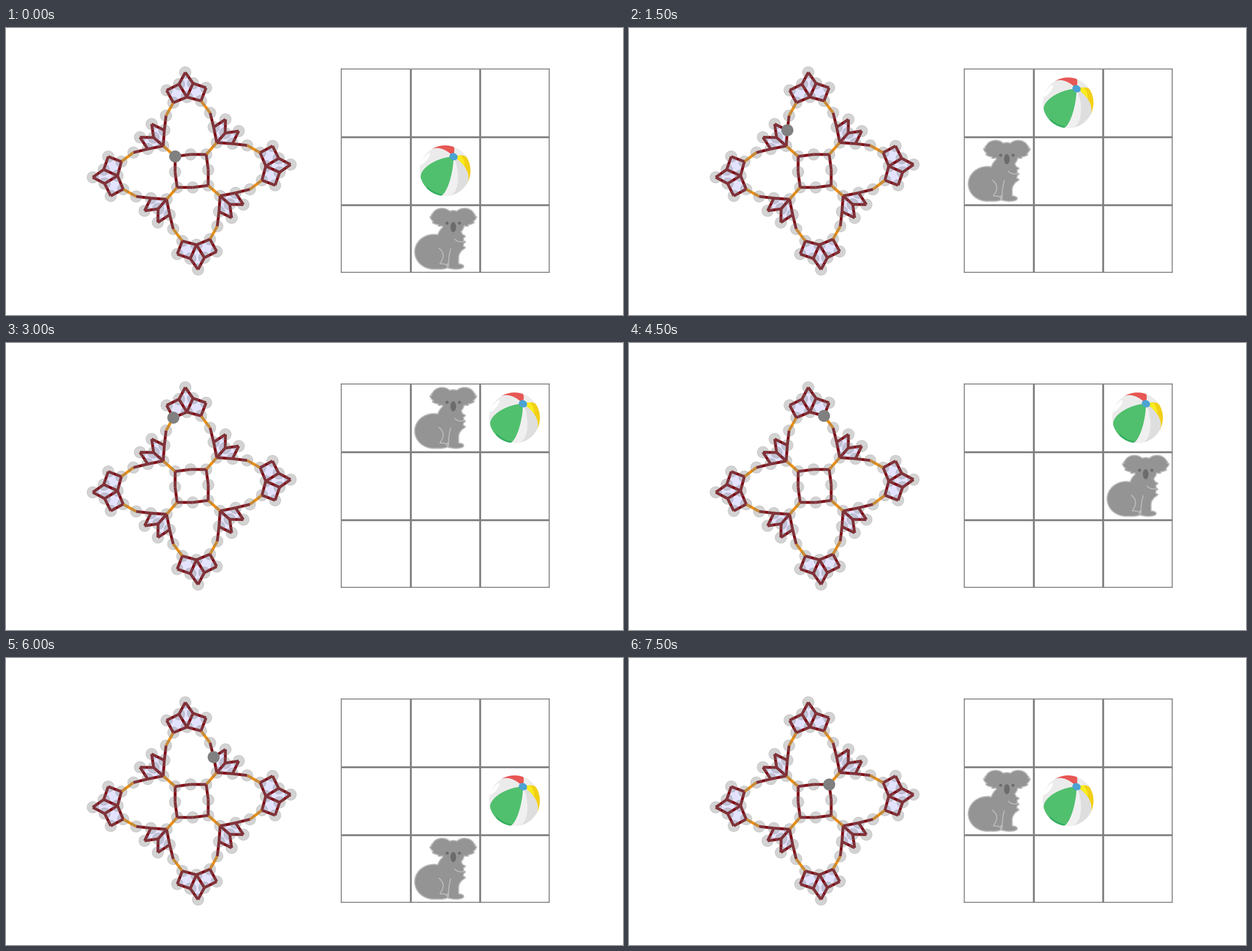
These frames come from a looping animation (1095x511 px, 8000 ms). A matplotlib script:

```python
import numpy as np
import matplotlib.pyplot as plt
from matplotlib.animation import FuncAnimation
from matplotlib.collections import LineCollection
from matplotlib.patches import Circle, Ellipse, PathPatch, Polygon
from matplotlib.path import Path
from matplotlib.transforms import Affine2D

W, H, DPI = 1095, 511, 64
PX = 72 / DPI  # one pixel in points

fig = plt.figure(figsize=(W / DPI, H / DPI), dpi=DPI, facecolor="white")
ax = fig.add_axes([0, 0, 1, 1])
ax.set_xlim(0, W)
ax.set_ylim(H, 0)
ax.axis("off")


# ---- state graph: one arm, repeated by quarter turns ----
HUB = np.array([329.5, 254.5])
DIAGONAL, UPRIGHT = np.radians(-138.6), np.radians(-93.7)


def polar(angle, along, across=0):
    u = np.array([np.cos(angle), np.sin(angle)])
    return HUB + along * u + across * np.array([-u[1], u[0]])


def fan(angle, half, mirror):
    """Node positions by koala cell, mirrored about the fan's axis."""
    nodes = {}
    for cell, (along, across) in half.items():
        nodes[cell] = polar(angle, along, across)
        nodes[mirror(*cell)] = polar(angle, along, -across)
    return nodes


# Each group holds all states with the ball on one kind of cell.
EDGE_BALL = fan(DIAGONAL,
                {(1, 1): (67.3, 0), (1, 2): (90, 0), (0, 1): (84.3, 22.3),
                 (0, 0): (99.2, 43.8), (0, 2): (108.5, 15.7)},
                lambda c, r: (2 - c, r))
CORNER_BALL = fan(UPRIGHT,
                  {(1, 1): (131.8, 0), (0, 2): (175.9, 0),
                   (1, 0): (123.4, -24.6), (0, 0): (146.1, -35.1),
                   (0, 1): (155.6, -12.5)},
                  lambda c, r: (2 - r, 2 - c))
CENTRE_BALL = {(1, 2): polar(DIAGONAL, 39), (0, 2): polar(UPRIGHT, 29.5)}


def turn(p, quarters):
    x, y = np.subtract(p, HUB)
    for _ in range(quarters):
        x, y = -y, x
    return HUB + (x, y)


def cell_edges(nodes):
    """Pairs of positions whose cells are side by side."""
    return [(nodes[c], nodes[d]) for c in nodes
            for d in ((c[0] + 1, c[1]), (c[0], c[1] + 1)) if d in nodes]


def cell_faces(nodes):
    """Squares of four neighbouring cells."""
    squares = [[(c, r), (c + 1, r), (c + 1, r + 1), (c, r + 1)]
               for c in range(2) for r in range(2)]
    return [[nodes[k] for k in s] for s in squares
            if all(k in nodes for k in s)]


corner, side = CENTRE_BALL.values()
walks = cell_edges(EDGE_BALL) + cell_edges(CORNER_BALL)
walks += [(corner, side), (side, turn(corner, 1))]
pushes = [(corner, EDGE_BALL[1, 1]),
          (EDGE_BALL[0, 0], CORNER_BALL[1, 0]),
          (CORNER_BALL[2, 1], turn(EDGE_BALL[2, 0], 1))]
faces = cell_faces(EDGE_BALL) + cell_faces(CORNER_BALL)


def all_turns(shapes):
    return [[turn(p, q) for p in s] for q in range(4) for s in shapes]


for f in all_turns(faces):
    ax.add_patch(Polygon(f, fc="#e3e3ff", ec="none", zorder=1))
for lines, colour in ((pushes, "#ee9012"), (walks, "#800a14")):
    ax.add_collection(LineCollection(all_turns(lines), colors=colour,
                                     linewidths=5 * PX, capstyle="butt",
                                     zorder=2))
for group in (EDGE_BALL, CORNER_BALL, CENTRE_BALL):
    for (p,) in all_turns([[p] for p in group.values()]):
        ax.add_patch(Circle(p, 10.2, fc=(0.5, 0.5, 0.5, 0.34),
                            ec=(0.5, 0.5, 0.5, 0.3), lw=PX, zorder=3))

marker = ax.add_patch(Circle((0, 0), 10.6, fc="#808080", ec="none", zorder=4))


# ---- board ----
ORIGIN, CELL = np.array([594.5, 72.7]), np.array([123.2, 120.9])
END = ORIGIN + 3 * CELL

for i in range(4):
    x, y = ORIGIN + i * CELL
    outer = i in (0, 3)
    style = dict(color="#808080", lw=(1.7 if outer else 3.4) * PX, zorder=5,
                 solid_capstyle="projecting" if outer else "butt")
    ax.plot([x, x], [ORIGIN[1], END[1]], **style)
    ax.plot([ORIGIN[0], END[0]], [y, y], **style)


def cell_centre(cell):
    return ORIGIN + CELL * (np.array(cell) + 0.5)


# ---- sprites ----
class Sprite:
    def __init__(self, z):
        self.shift = Affine2D()
        self.trans = self.shift + ax.transData
        self.z = z

    def add(self, path, **style):
        self.z += 0.01
        ax.add_patch(PathPatch(path, transform=self.trans, zorder=self.z,
                               capstyle="round", joinstyle="round", **style))

    def fill(self, path, colour):
        self.add(path, fc=colour, ec="none")

    def stroke(self, path, colour, width):
        self.add(path, fill=False, ec=colour, lw=width * PX)

    def move(self, pos):
        self.shift.clear().translate(*pos)


def oval(x, y, w, h, angle=0):
    e = Ellipse((x, y), w, h, angle=angle)
    return e.get_path().transformed(e.get_patch_transform())


def bend(start, control, end):
    return Path([start, control, end], [Path.MOVETO, Path.CURVE3, Path.CURVE3])


# Ball: panels between great circles that meet at a tilted pole
RADIUS = 45
POLE = np.array([0.33, -0.56, 0.76])


def on_sphere(degrees, t):
    """Point at share t of the way from the pole to the rim."""
    a = np.radians(degrees)
    rim = np.array([np.cos(a), np.sin(a), 0])
    arc = np.arccos(rim @ POLE)
    p = np.sin((1 - t) * arc) * POLE + np.sin(t * arc) * rim
    return RADIUS * p[:2] / np.sin(arc)


def panel(a, b, t0=0, t1=1, n=30):
    share, angle = np.linspace(t0, t1, n), np.linspace(a, b, n)
    return Path([on_sphere(a, t) for t in share]
                + [on_sphere(d, t1) for d in angle]
                + [on_sphere(b, t) for t in share[::-1]]
                + [on_sphere(d, t0) for d in angle[::-1]])


ball = Sprite(6)
ball.fill(Path.circle((0, 0), RADIUS), "#ebebeb")
ball.fill(panel(31, 80), "#dedede")
ball.fill(panel(80, 101), "#f0f0f0")
ball.fill(oval(-35, -21, 7, 26, 38), "white")
ball.fill(panel(-124, -71), "#e75754")
ball.fill(panel(-31, 31), "#f2d015")
ball.fill(panel(-31, 31, 0, 0.4), "#f9ec1f")
ball.fill(panel(101, 162), "#50c06e")
ball.fill(panel(101, 135, 0.84, 1), "#34ae62")
ball.fill(oval(15, -25, 15, 12.5, 25), "#4ba3d3")

# Koala: overlapping ovals with one shared outline
LIGHT, GREY, DARK = "#bcbcbc", "#949494", "#6c6c6c"
FACE = 14.5


def ear(sign):
    a = np.linspace(0, 2 * np.pi, 150)
    tuft = np.where((a > 1.4) & (a < 3.4), 0.2 * (a * 1.6 % 1), 0)
    r = 1 + tuft
    return Path(np.column_stack([FACE + sign * (20 - 17 * r * np.cos(a)),
                                 -39 + 14 * r * np.sin(a)]))


koala = Sprite(7)
parts = [ear(-1), ear(1),
         oval(FACE, -28, 38, 42),       # head
         oval(9, 5, 46, 58),            # chest
         oval(-20, 23.5, 66, 60),       # rump
         oval(-10, 49, 30, 9),          # hind foot
         Path([(6, 15), (6, 52), (23, 52), (23, 32), (29, 8)]),
         oval(19, 49.5, 26, 8)]         # front foot
parts += [Path([(24, y), (35, y + 6), (24, y + 14)]) for y in (-10, 0, 10)]
for part in parts:
    koala.stroke(part, LIGHT, 4)
for part in parts:
    koala.fill(part, GREY)
for crease in (bend((-11, 17), (3, 28), (-9, 44)),
               bend((-9, 45), (2, 44), (4, 50)),
               bend((10, 18), (6, 30), (6, 50)),
               bend((17, 1), (24, 8), (33, 5))):
    koala.stroke(crease, LIGHT, 1.8)
koala.fill(oval(FACE, -20.5, 10, 18), DARK)
for dx in (-11, 11):
    koala.fill(oval(FACE + dx, -27.5, 5.4, 5.4), DARK)


# ---- story: (marker position, koala cell, ball cell) ----
def steps(nodes, cells, ball_cell, quarters=0):
    """Cells index the unturned arm; the board turns along with it."""
    out = []
    for cell in cells:
        c, r = cell
        for _ in range(quarters):
            c, r = 2 - r, c
        out.append((turn(nodes[cell], quarters), (c, r), ball_cell))
    return out


STORY = (steps(CENTRE_BALL, [(1, 2)], (1, 1))
         + steps(EDGE_BALL, [(1, 1), (0, 1), (0, 0)], (1, 0))
         + steps(CORNER_BALL, [(1, 0), (1, 1), (2, 1)], (2, 0))
         + steps(EDGE_BALL, [(2, 0), (2, 1), (1, 1)], (2, 1), 1)
         + steps(CENTRE_BALL, [(1, 2)], (1, 1), 1))

TICK, HOLD, LOOP = 250, 750, 8000


def update(i):
    pos, koala_cell, ball_cell = STORY[i * TICK // HOLD]
    marker.center = pos
    koala.move(cell_centre(koala_cell))
    ball.move(cell_centre(ball_cell))
    return []


anim = FuncAnimation(fig, update, frames=LOOP // TICK, interval=TICK,
                     repeat=True, repeat_delay=0, blit=False)
plt.show()
```
